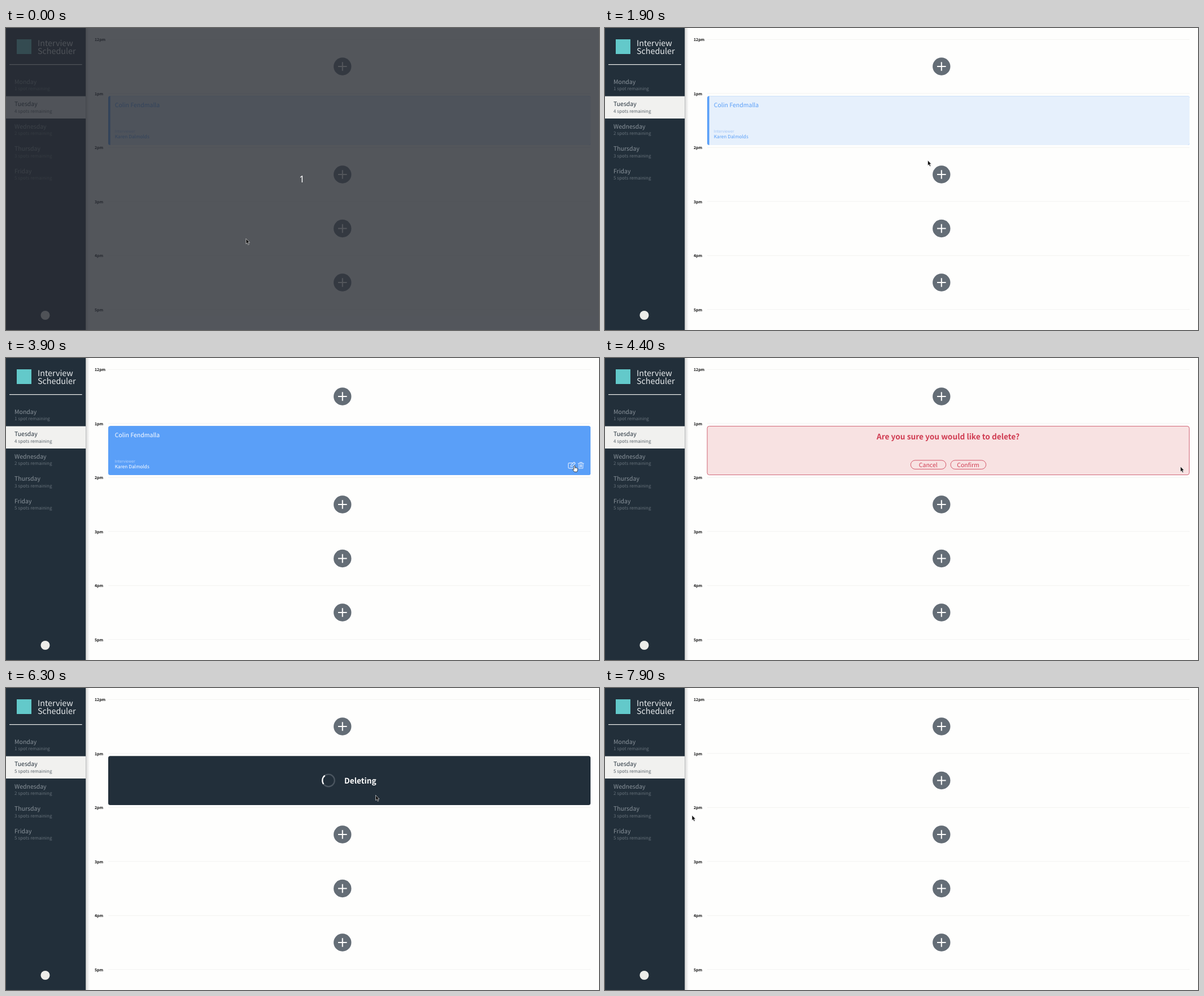
These frames come from a looping animation (1050 by 534 pixels, 8000 ms). An HTML page:

```html
<!DOCTYPE html>
<html lang="en">
<head>
<meta charset="utf-8">
<title>Interview Scheduler</title>
<style>
  html, body { margin: 0; height: 100%; overflow: hidden; background: #fefefd; }
  svg { display: block; width: 100vw; height: 100vh; }
  text { font-family: "Noto Sans CJK JP", "Noto Sans CJK SC", "Noto Sans", sans-serif; font-size: 10.5px; text-rendering: geometricPrecision; white-space: pre; }
  .title { font-size: 14.3px; font-weight: 300; fill: #e9ecee; }
  .day { fill: #8a939b; }
  .spots { font-size: 8.05px; font-weight: 300; fill: #66717a; }
  .selected .day { fill: #222f3a; }
  .selected .spots { fill: #59636b; }
  .hour { font-size: 6.9px; font-weight: 700; fill: #111; }
  .label { font-size: 6.73px; font-weight: 300; fill: #a0c5f6; }
  .person { font-size: 8.25px; }
  .big { font-size: 13.7px; font-weight: 600; }
  .mid { text-anchor: middle; }
  #booked { fill: #5a9ff8; }
  #booked.hover { fill: #fff; }
  #booked.hover .label { fill: #b5d4fc; }
  #booked .body { fill: #e6f0fc; }
  #booked.hover .body { fill: #5a9ff8; }
  #booked .icons { display: none; fill: none; stroke: #d9e8fd; stroke-width: 1.2; stroke-linejoin: round; stroke-linecap: round; }
  #booked.hover .icons { display: inline; }
  #asking { fill: #d03c52; }
  #asking .pill { fill: none; stroke: #d4586a; }
  #confirm.hover { fill: #fff; }
  #confirm.hover .pill { fill: #dc3b4b; stroke: #dc3b4b; }
</style>
</head>
<body>
<svg viewBox="0 0 1050 534" preserveAspectRatio="none">
  <defs>
    <linearGradient id="shade">
      <stop offset="0" stop-color="#000" stop-opacity=".16"/>
      <stop offset="1" stop-color="#000" stop-opacity="0"/>
    </linearGradient>
    <g id="plus">
      <circle r="15.7" fill="#646d76"/>
      <path d="M-7.8 0H7.8M0 -7.8V7.8" stroke="#fefefd" stroke-width="2"/>
    </g>
  </defs>

  <g id="schedule"></g>

  <g id="booked">
    <rect x="181" y="120.3" width="854" height="86.7" rx="3.5" fill="#5a9ff8"/>
    <path class="body" d="M184.6 120.3H1031.5a3.5 3.5 0 0 1 3.5 3.5V203.5a3.5 3.5 0 0 1 -3.5 3.5H184.6z"/>
    <text x="192.7" y="139.6">Colin Fendmalla</text>
    <text class="label" x="192.7" y="185.3">Interviewer</text>
    <text class="person" x="192.7" y="195">Karen Dalmolds</text>
    <g class="icons">
      <path d="M1003 185.7H997.2a1.5 1.5 0 0 0 -1.5 1.5V193.6a1.5 1.5 0 0 0 1.5 1.5H1004a1.5 1.5 0 0 0 1.5 -1.5V191"/>
      <path d="M1000 191.8L1000.4 189.4L1005.8 184.2L1008 186.3L1002.5 191.6z"/>
      <path d="M1013 186.3H1023M1016 186V184.5H1020V186M1014 186.5L1014.5 195.2H1021.5L1022 186.5M1016.5 188.5V193M1018 188.5V193M1019.5 188.5V193" stroke-width="1"/>
    </g>
  </g>

  <g id="asking">
    <rect x="181" y="120.6" width="853.5" height="86" rx="3.5" fill="#f8e2e2" stroke="#cc5568" stroke-width=".9"/>
    <text class="big mid" x="607.5" y="144">Are you sure you would like to delete?</text>
    <rect class="pill" x="541.3" y="180.9" width="62.4" height="15.6" rx="7.8"/>
    <text class="mid" x="572.3" y="192.7">Cancel</text>
    <g id="confirm">
      <rect class="pill" x="612" y="180.9" width="62.6" height="15.6" rx="7.8"/>
      <text class="mid" x="643" y="192.7">Confirm</text>
    </g>
  </g>

  <g id="deleting">
    <rect x="181" y="120.3" width="854" height="86.7" rx="3.5" fill="#222f3a"/>
    <g transform="translate(571 163.5)" fill="none" stroke-width="2.2">
      <circle r="10.8" stroke="#4b5660"/>
      <path id="arc" d="M-10.8 0A10.8 10.8 0 0 1 0 -10.8" stroke="#fff"/>
    </g>
    <text class="big" x="599" y="168.5" fill="#fff">Deleting</text>
  </g>

  <use id="free" href="#plus" x="595.8" y="163.5"/>

  <rect x="141" width="7" height="534" fill="url(#shade)"/>
  <rect width="141.2" height="534" fill="#222f3a"/>
  <rect x="19" y="20" width="26" height="26" fill="#63c9ca"/>
  <text class="title" x="56" y="31.8">Interview</text>
  <text class="title" x="56" y="45.8">Scheduler</text>
  <rect x="6" y="64" width="128.7" height="1.2" fill="#f1f1ef"/>
  <g id="days"></g>
  <circle cx="69.5" cy="508" r="8" fill="#ecece9"/>

  <g id="countdown">
    <rect width="1050" height="534" fill="#282c34" fill-opacity=".8"/>
    <text class="mid" x="524" y="273" fill="#fff" style="font:16.5px 'Noto Sans',sans-serif">1</text>
  </g>

  <g id="cursor">
    <path id="arrow" d="M0 0V9.2L2 7.4L3.7 10.8L5.3 10L3.7 6.7H6.5Z" fill="#111" stroke="#fff" stroke-width=".6"/>
    <path id="hand" d="M-1 1Q0 -.5 1 1V4.3H4Q5.5 4.6 5.5 6.3V8Q5.4 10 4.3 11.3H-.3L-3.5 7.2Q-3.3 6 -1 7.2Z" fill="#fff" stroke="#222" stroke-width=".8"/>
  </g>
</svg>
<script>
const $ = id => document.getElementById(id);
const show = (id, on) => $(id).style.display = on ? '' : 'none';

const HOUR_STEP = 95.5, DAY_STEP = 39.45;
$('schedule').innerHTML = ['12pm', '1pm', '2pm', '3pm', '4pm', '5pm'].map((hour, i) => {
  const y = 20.3 + i * HOUR_STEP;
  const plus = i === 1 || i === 5 ? '' : `<use href="#plus" x="595.8" y="${y + 47.7}"/>`;
  return `<text class="hour" x="157" y="${y + 2.8}">${hour}</text>
    <rect x="181" y="${y - 0.5}" width="854" height="1" fill="#f2f2f1"/>${plus}`;
}).join('');

const days = [['Monday', '1 spot'], ['Tuesday', '4 spots'], ['Wednesday', '2 spots'],
  ['Thursday', '3 spots'], ['Friday', '5 spots']];
$('days').innerHTML = days.map(([day, spots], i) => {
  const selected = day === 'Tuesday';
  const row = selected ? '<rect y="21.6" width="141.2" height="39.4" fill="#f1f1ef" transform="translate(0 -39.4)"/>' : '';
  return `<g class="${selected ? 'selected' : ''}" transform="translate(0 ${99 + i * DAY_STEP})">${row}
    <text class="day" x="15" y="0">${day}</text>
    <text class="spots" x="15" y="11.3">${spots} remaining</text></g>`;
}).join('');
const tuesdaySpots = document.querySelector('.selected .spots');

// Pointer path: time, x, y
const path = [
  [0, 425, 372.5], [1200, 425, 372.5], [1400, 432, 368], [1500, 432, 368],
  [1900, 571.5, 234], [2000, 571.5, 234], [2400, 597, 190], [2600, 597, 190],
  [2900, 688, 175.5], [3500, 982, 186], [4100, 1019, 192], [4600, 1019, 192],
  [4700, 1018.5, 192], [4800, 1018.5, 192], [5500, 668, 191], [5700, 654.5, 189.5],
  [7000, 654.5, 189.5], [7400, 484, 231], [7500, 457, 231], [7600, 457, 231], [7900, 154, 225]
];

function pointer(t) {
  const i = path.findIndex(p => p[0] > t);
  if (i < 0) return path[path.length - 1].slice(1);
  const [t0, x0, y0] = path[i - 1], [t1, x1, y1] = path[i];
  const k = (t - t0) / (t1 - t0);
  return [x0 + (x1 - x0) * k, y0 + (y1 - y0) * k];
}

function draw(t) {
  const [x, y] = pointer(t);
  const booked = t < 4400, asking = !booked && t < 6200, deleting = t >= 6200 && t < 7500;
  const onIcon = booked && x > 994;
  const onConfirm = asking && x > 612 && x < 675;

  show('countdown', t < 500);
  show('booked', booked);
  show('asking', asking);
  show('deleting', deleting);
  show('free', t >= 7500);
  $('booked').classList.toggle('hover', y < 207);
  $('confirm').classList.toggle('hover', onConfirm);
  tuesdaySpots.textContent = `${t < 6200 ? 4 : 5} spots remaining`;
  $('arc').setAttribute('transform', `rotate(${(t - 7400) * 0.36})`);

  $('cursor').setAttribute('transform', `translate(${x} ${y})`);
  show('hand', onIcon || onConfirm);
  show('arrow', !onIcon && !onConfirm);
}

const start = performance.now();
function tick() {
  const t = (performance.now() - start) % 8000;
  draw(Math.floor(t / 100) * 100);
  requestAnimationFrame(tick);
}
tick();
</script>
</body>
</html>
```
